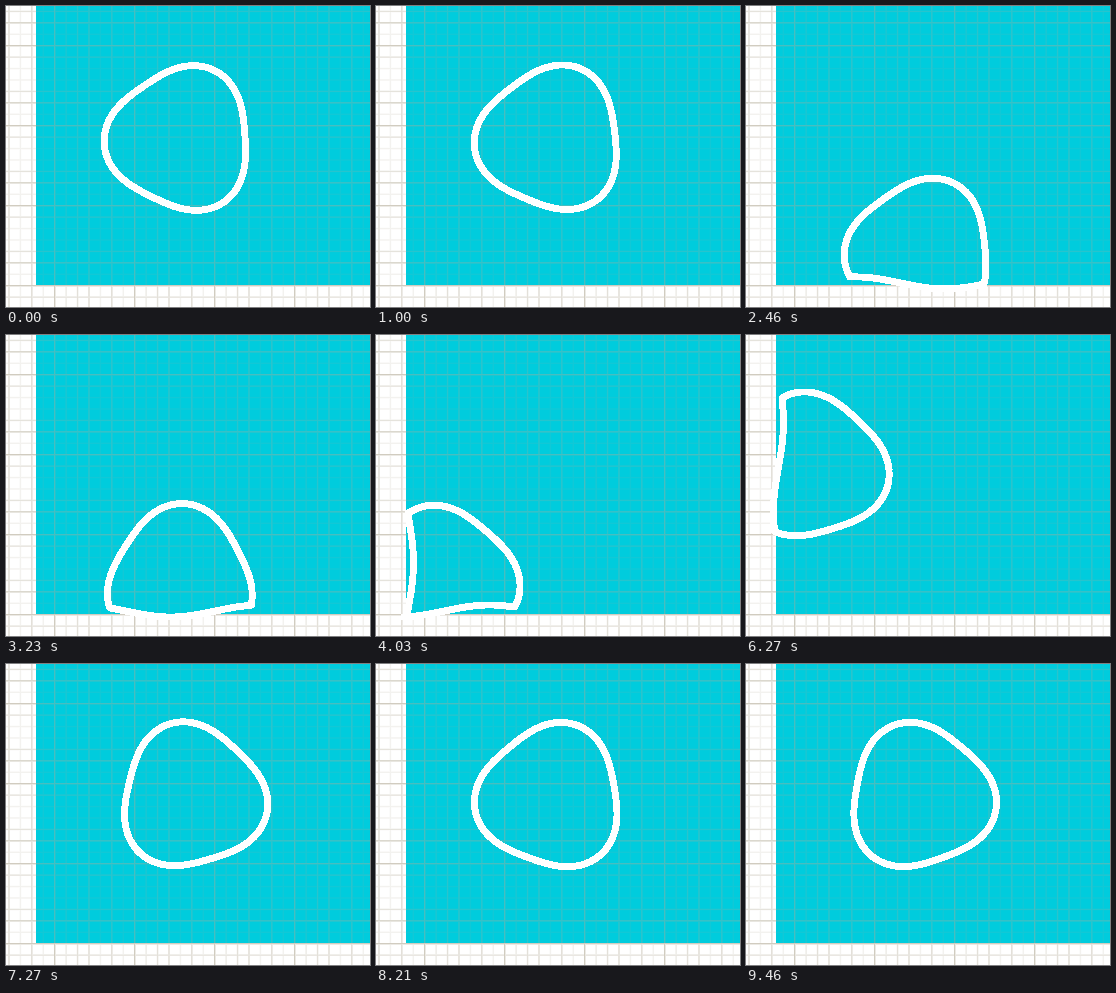
These frames come from a looping animation (364 px wide and 301 px high, 9530 ms). A matplotlib script:

```python
import numpy as np
import matplotlib.pyplot as plt
from matplotlib.animation import FuncAnimation

W, H, DPI = 364, 301, 64
LOOP, FRAMES = 9530, 248
INTERVAL = LOOP / FRAMES
LEFT, BOTTOM = 30, 279
PX = 72 / DPI

# the picture steps on this beat, in ms
BEAT, FIRST = 77.65, 530

HOME = np.array([174.5, 133.0])
SHIFT = np.array([-107.0, 112.0])
# start time in s, axis, direction along SHIFT
MOVES = [(1.5, 1, 1), (3.5, 0, 1), (5.3, 1, -1), (7.05, 0, -1)]

# orientation of the three-lobed outline, in degrees
TURN_T = [0, 1.0, 2.46, 4.03, 6.27, 8.21, 9.46]
TURN = [56, -429, -1140, -1912, -2984, -3906, -4550]

theta = np.linspace(0, 2 * np.pi, 241)


def rules(start, size, weights):
    """Ink along one axis: 7 lines per 80 px, with their own strengths."""
    ink = np.zeros(size)
    px = np.arange(size)
    for k in range(-7, 35):
        a = start + k * 80 / 7
        cover = np.minimum(px + 1, a + 1.4) - np.maximum(px, a)
        ink = np.maximum(ink, weights[k % 7] * np.clip(cover, 0, 1))
    return ink


def paper():
    """Ruled sheet with the cyan panel showing the rules through."""
    across = rules(48, W, [1, .4, .6, .7, .25, .7, .25])
    down = rules(39, H, [1, .55, .25, .25, .55, .9, .25])
    ink = np.maximum(across[None, :], down[:, None])[..., None]
    base = np.ones((H, W, 3))
    base[:BOTTOM, LEFT:] = (0, .80, .867)
    strength = np.full((H, W, 1), .6)
    strength[:BOTTOM, LEFT:] = .4
    mix = ink * strength
    return base * (1 - mix) + np.array([.70, .67, .59]) * mix


def spring(tau):
    """Step from 0 to 1 with a damped overshoot."""
    if tau <= 0:
        return 0.0
    w, k = 10, 5
    return 1 - np.exp(-k * tau) * (np.cos(w * tau) + k / w * np.sin(w * tau))


def center(t):
    c = HOME.copy()
    for start, axis, sign in MOVES:
        c[axis] += sign * SHIFT[axis] * spring(t - start)
    return c


def outline(t):
    cx, cy = center(t)
    turn = np.radians(np.interp(t, TURN_T, TURN))
    r = 70.5 + 6 * np.cos(3 * (theta - turn))
    x, y = cx + r * np.cos(theta), cy + r * np.sin(theta)

    # the walls press the outline into a soft wave and give way on impact
    rest = HOME + SHIFT
    floor = 276 + 6 * np.sin(.035 * (x - cx) + .7 + 1.55 * (t - 2.46))
    floor = floor + .9 * max(0, cy - rest[1])
    wall = 32.5 - 5 * np.sin(.035 * (y - cy) + .43 * (t - 6.27))
    wall = wall - 1.2 * max(0, rest[0] - cx)
    return np.maximum(x, wall), np.minimum(y, floor)


def pose_time(i):
    """Time in s of the beat that frame i falls on."""
    beat = np.floor(((i + .5) * INTERVAL - FIRST + 25) / BEAT)
    if beat == -1:
        beat = -2  # brief hold
    return max(0, FIRST + beat * BEAT) / 1000


fig = plt.figure(figsize=(W / DPI, H / DPI), dpi=DPI, facecolor="white")
ax = fig.add_axes([0, 0, 1, 1])
ax.axis("off")
ax.imshow(paper(), extent=(0, W, H, 0), aspect="auto", interpolation="none")
ax.set_xlim(0, W)
ax.set_ylim(H, 0)
blob, = ax.plot([], [], color="white", lw=5.8 * PX, antialiased=False,
                solid_joinstyle="round")


def draw(i):
    blob.set_data(*outline(pose_time(i)))
    return blob,


anim = FuncAnimation(fig, draw, frames=FRAMES, interval=INTERVAL, repeat=True,
                     repeat_delay=0, blit=False)
plt.show()
```
